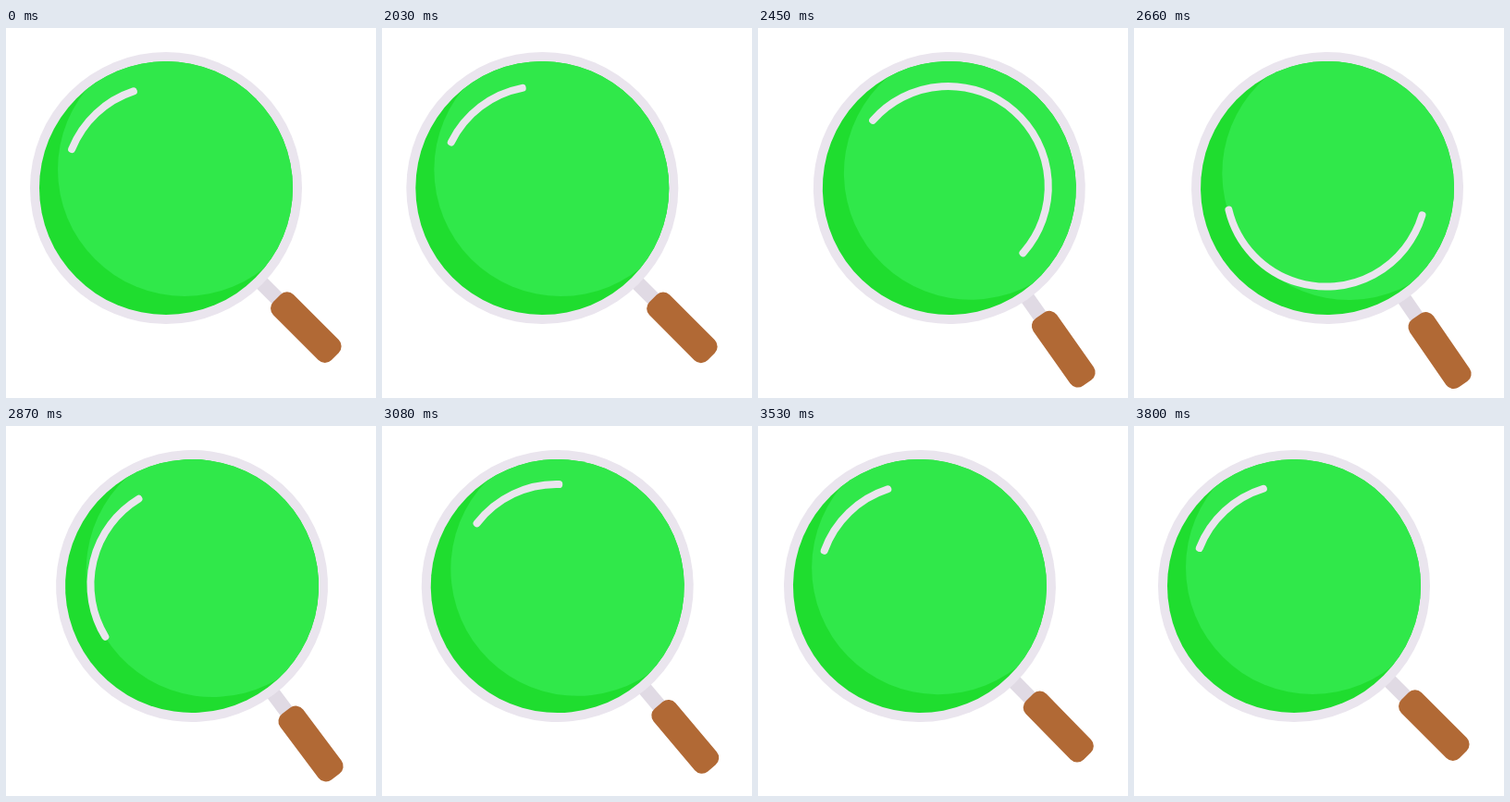
An HTML page with a canvas that plays this animation: 400 by 400 pixels, repeating every 3.83 s.

```html
<!DOCTYPE html>
<html lang="en">
<head>
<meta charset="utf-8">
<title>Magnifying glass</title>
<style>
  html, body { margin: 0; width: 100%; height: 100%; overflow: hidden; background: #fff; }
  canvas { display: block; }
</style>
</head>
<body>
<canvas id="stage" width="400" height="400"></canvas>
<script>
const ctx = document.getElementById('stage').getContext('2d');
const LOOP = 3830, HOLD = 2000, STEP = 30, LAST = 60;
const RAD = Math.PI / 180;
const RIM = '#eae5ee', SHAFT = '#e0dae4', WOOD = '#b16935';
const GLASS = '#30e84a', SHADE = '#1fdd2f';

// Sideways swing of the lens, in steps and pixels
const PEAK = 18.7, SWING = 37, TILT = 0.29;

// Both ends of the shine, in degrees, over two turns
const KEYS = [0, 1, 10, 22, 36, 44, 60];
const tail = curve(KEYS, [201.8, 206.2, 453.1, 736.7, 937.6, 918.6, 921.3]);
const head = curve(KEYS, [251.8, 259.2, 630.3, 886.5, 991.5, 971.5, 972.9]);

// Shape-preserving cubic through the given points
function curve(xs, ys) {
  const last = xs.length - 1;
  const slope = i => (ys[i + 1] - ys[i]) / (xs[i + 1] - xs[i]);
  const tangents = xs.map((x, i) => {
    if (i === 0 || i === last) return 0;
    const a = slope(i - 1), b = slope(i);
    if (a * b <= 0) return 0;
    const ha = x - xs[i - 1], hb = xs[i + 1] - x;
    const wa = 2 * hb + ha, wb = hb + 2 * ha;
    return (wa + wb) / (wa / a + wb / b);
  });
  return x => {
    let i = 0;
    while (i < last - 1 && x > xs[i + 1]) i++;
    const h = xs[i + 1] - xs[i], u = (x - xs[i]) / h, v = 1 - u;
    return ys[i] * v * v * (1 + 2 * u) + ys[i + 1] * u * u * (3 - 2 * u) +
      h * u * v * (tangents[i] * v - tangents[i + 1] * u);
  };
}

// Cubic Bezier ease with flat ends
function ease(x, x1, x2) {
  let lo = 0, hi = 1;
  for (let i = 0; i < 24; i++) {
    const s = (lo + hi) / 2, r = 1 - s;
    if (3 * r * r * s * x1 + 3 * r * s * s * x2 + s * s * s < x) lo = s;
    else hi = s;
  }
  return lo * lo * (3 - 2 * lo);
}

function swing(n) {
  return SWING * (n < PEAK
    ? ease(n / PEAK, 0.33, 0.62)
    : 1 - ease((n - PEAK) / (LAST - PEAK), 0.29, 0.42));
}

function disc(x, y, r, color) {
  ctx.fillStyle = color;
  ctx.beginPath();
  ctx.arc(x, y, r, 0, 2 * Math.PI);
  ctx.fill();
}

function drawHandle() {
  ctx.save();
  ctx.rotate(45 * RAD);
  ctx.fillStyle = SHAFT;
  ctx.fillRect(140, -8.5, 40, 16);
  ctx.fillStyle = WOOD;
  ctx.beginPath();
  ctx.roundRect(169, -16, 89, 31, 10);
  ctx.fill();
  ctx.restore();
}

function drawLens() {
  disc(0, 0, 147, RIM);
  disc(0, 0, 137, SHADE);
  ctx.save();
  ctx.beginPath();
  ctx.arc(0, 0, 137, 0, 2 * Math.PI);
  ctx.clip();
  disc(20, -20, 137, GLASS);
  ctx.restore();
}

function drawShine(n) {
  ctx.strokeStyle = RIM;
  ctx.lineWidth = 8;
  ctx.lineCap = 'round';
  ctx.beginPath();
  ctx.arc(-1.3, -1.7, 108.3, tail(n) * RAD, head(n) * RAD);
  ctx.stroke();
}

function draw(now) {
  const t = now % LOOP;
  const n = Math.min(LAST, Math.max(0, Math.floor((t - HOLD) / STEP)));
  const dx = swing(n);

  ctx.fillStyle = '#fff';
  ctx.fillRect(0, 0, 400, 400);
  ctx.save();
  ctx.translate(173 + dx, 173);
  ctx.save();
  ctx.rotate(dx * TILT * RAD);
  drawHandle();
  drawLens();
  ctx.restore();
  drawShine(n);
  ctx.restore();
  requestAnimationFrame(draw);
}

draw(0);
</script>
</body>
</html>
```
